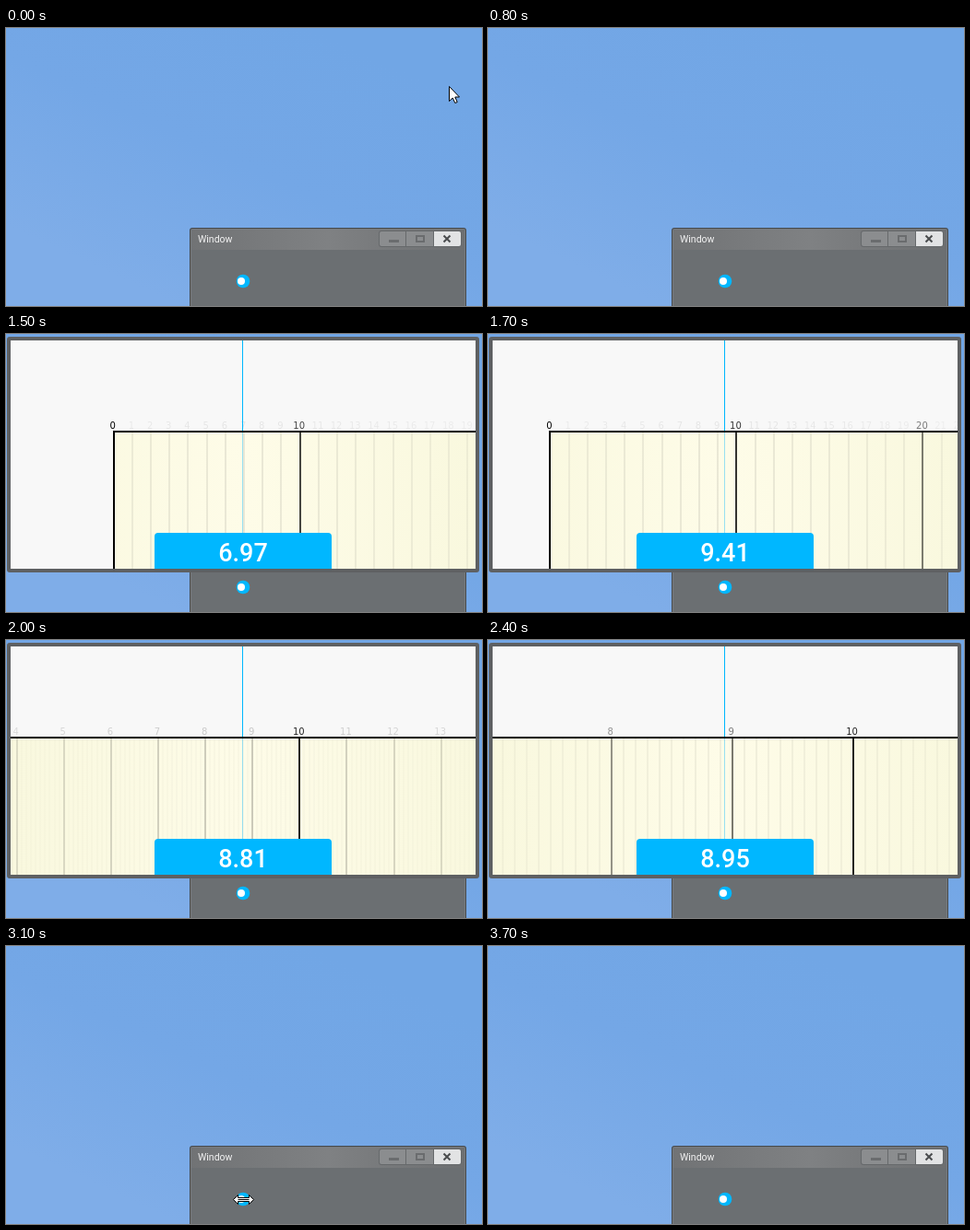
These frames come from a looping animation (516x302 px, 4000 ms). An HTML page with a canvas:

```html
<!DOCTYPE html>
<html lang="en">
<head>
<meta charset="utf-8">
<title>Zooming value slider</title>
<style>
  html, body { margin: 0; width: 100%; height: 100%; overflow: hidden; }
  canvas { display: block; }
</style>
</head>
<body>
<canvas id="stage" width="516" height="302"></canvas>
<script>
const ctx = document.getElementById('stage').getContext('2d');
const LOOP = 4000, STEP = 100;
const BLUE = '#00b7ff';
const CENTER = 256.5;

const linear = (t, from, to) => Math.min(1, Math.max(0, (t - from) / (to - from)));
const smooth = (t, from, to) => {
  const p = linear(t, from, to);
  return p * p * (3 - 2 * p);
};
const mix = (a, b, p) => a + (b - a) * p;

// Sweep up, then settle while the scale zooms in.
const valueAt = t =>
  9.41 * smooth(t, 1100, 1700) - 0.6 * smooth(t, 1700, 2000) + 0.27 * smooth(t, 2000, 2800);
const scaleAt = t =>
  20.2 * 2.53 ** linear(t, 1700, 2000) * 6.56 ** linear(t, 2000, 2800);

function rect(x, y, w, h, fill) {
  ctx.fillStyle = fill;
  ctx.fillRect(x, y, w, h);
}

function rounded(x, y, w, h, radii, fill) {
  ctx.beginPath();
  ctx.roundRect(x, y, w, h, radii);
  ctx.fillStyle = fill;
  ctx.fill();
}

function disc(x, y, r, fill) {
  ctx.beginPath();
  ctx.arc(x, y, r, 0, 7);
  ctx.fillStyle = fill;
  ctx.fill();
}

function text(str, x, y, font, fill, align = 'center') {
  ctx.font = font;
  ctx.textAlign = align;
  ctx.fillStyle = fill;
  ctx.fillText(str, x, y);
}

function gradient(x0, y0, x1, y1, ...colors) {
  const g = ctx.createLinearGradient(x0, y0, x1, y1);
  colors.forEach((c, i) => g.addColorStop(i / (colors.length - 1), c));
  return g;
}

function outlined(path, x, y) {
  ctx.save();
  ctx.translate(x, y);
  const shape = new Path2D(path);
  ctx.fillStyle = '#fff';
  ctx.strokeStyle = '#000';
  ctx.lineWidth = 1;
  ctx.fill(shape);
  ctx.stroke(shape);
  ctx.restore();
}

const arrow = (x, y) =>
  outlined('M.5 .5V16.5L4.2 13L6.8 18.5L9.2 17.5L6.8 12H11.5Z', x, y);
const resizeArrow = (x, y) =>
  outlined('M-11 0L-6-5V-2H6V-5L11 0L6 5V2H-6V5Z M-6 0H6', x, y);

function drawDesktop() {
  rect(0, 0, 516, 302, gradient(330, 0, 190, 302, '#71a6e5', '#74a7e6', '#7fade8'));
}

function drawWindow() {
  rounded(199, 217, 300, 100, 3, '#45494c');
  rounded(200, 218, 298, 100, 2, '#777a7d');
  rect(201, 219, 296, 22, gradient(201, 0, 497, 0, '#717375', '#7f8183', '#6d6f71'));
  rect(201, 241, 296, 61, '#6b6f72');
  text('Window', 208, 233, '10.5px Roboto, sans-serif', '#f4f4f4', 'left');

  rounded(404, 220, 90, 18, 3, '#66696b');
  rounded(405, 221, 28, 16, [2, 0, 0, 2], '#8b8d8f');
  rect(434, 221, 29, 16, '#8b8d8f');
  rounded(464, 221, 29, 16, [0, 2, 2, 0], '#e2e3e4');
  rect(415, 230, 11, 3, '#6a6c6e');
  ctx.lineWidth = 2;
  ctx.strokeStyle = '#6a6c6e';
  ctx.strokeRect(445, 226, 8, 6);
  ctx.strokeStyle = '#4a4c4e';
  ctx.stroke(new Path2D('M474.5 225.5L481.5 232.5M481.5 225.5L474.5 232.5'));
}

function drawKnob() {
  disc(257, 275, 7.3, BLUE);
  disc(255, 275, 4, '#fff');
}

function drawTick(x, label, alpha) {
  ctx.globalAlpha = alpha;
  rect(Math.round(x), 107, 2, 148, '#000');
  if (label) text(label, x, 103, '10px "DejaVu Sans", sans-serif', '#000');
  ctx.globalAlpha = 1;
}

function drawRuler(value, scale) {
  const toX = v => CENTER + (v - value) * scale;
  const zero = Math.round(toX(0)), left = Math.max(5, zero);
  rect(left, 107, 509 - left, 148, gradient(5, 0, 509, 0, '#f9f8de', '#fefce8', '#f9f8de'));

  // Each decade of ticks darkens as its spacing grows and fades towards the edges.
  for (const digits of [-1, 0, 1, 2]) {
    const unit = 10 ** -digits, spacing = unit * scale;
    if (spacing < 3) continue;
    const first = Math.max(1, Math.floor((value - 265 / scale) / unit));
    for (let i = first; toX(i * unit) < 520; i++) {
      if (digits >= 0 && i % 10 === 0) continue;
      const x = toX(i * unit);
      const fade = 1 - 0.45 * Math.abs(x - CENTER) / CENTER;
      const label = spacing > 18 ? (i * unit).toFixed(Math.max(0, digits)) : '';
      drawTick(x, label, Math.min(0.85, spacing / 250 * fade));
    }
  }
  rect(left, 105, 509 - left, 2, '#000');
  drawTick(toX(0), '0', 1);
}

function drawPopup(t) {
  const value = valueAt(t);
  rounded(1, 3, 512, 256, 3, '#5e6062');
  rect(5, 7, 504, 248, '#f8f8f8');
  ctx.save();
  ctx.beginPath();
  ctx.rect(5, 7, 504, 248);
  ctx.clip();
  drawRuler(value, scaleAt(t));
  rect(256, 7, 1, 98, BLUE);
  ctx.globalAlpha = 0.4;
  rect(256, 107, 1, 109, BLUE);
  ctx.globalAlpha = 1;
  rounded(161, 216, 192, 39, [4, 4, 0, 0], BLUE);
  text(value.toFixed(2), 257, 247, '500 27px Roboto, sans-serif', '#fff');
  ctx.restore();
}

function drawPointer(t) {
  if (t <= 600) {
    const p = smooth(t, 0, 600);
    arrow(mix(480, 250, p), mix(63, 265, p));
  } else if (t === 700 || (t >= 3100 && t < 3300)) {
    resizeArrow(257.5, 275.5);
  } else if (t >= 3300 && t < 3700) {
    const p = smooth(t, 3200, 3700);
    arrow(mix(257, 533, p), mix(275, -26, p));
  }
}

const start = performance.now();
function frame() {
  const elapsed = (performance.now() - start) % LOOP;
  const t = Math.floor(elapsed / STEP) * STEP;
  drawDesktop();
  drawWindow();
  drawKnob();
  if (t >= 900 && t < 3100) drawPopup(t);
  drawPointer(t);
  requestAnimationFrame(frame);
}
frame();
</script>
</body>
</html>
```
